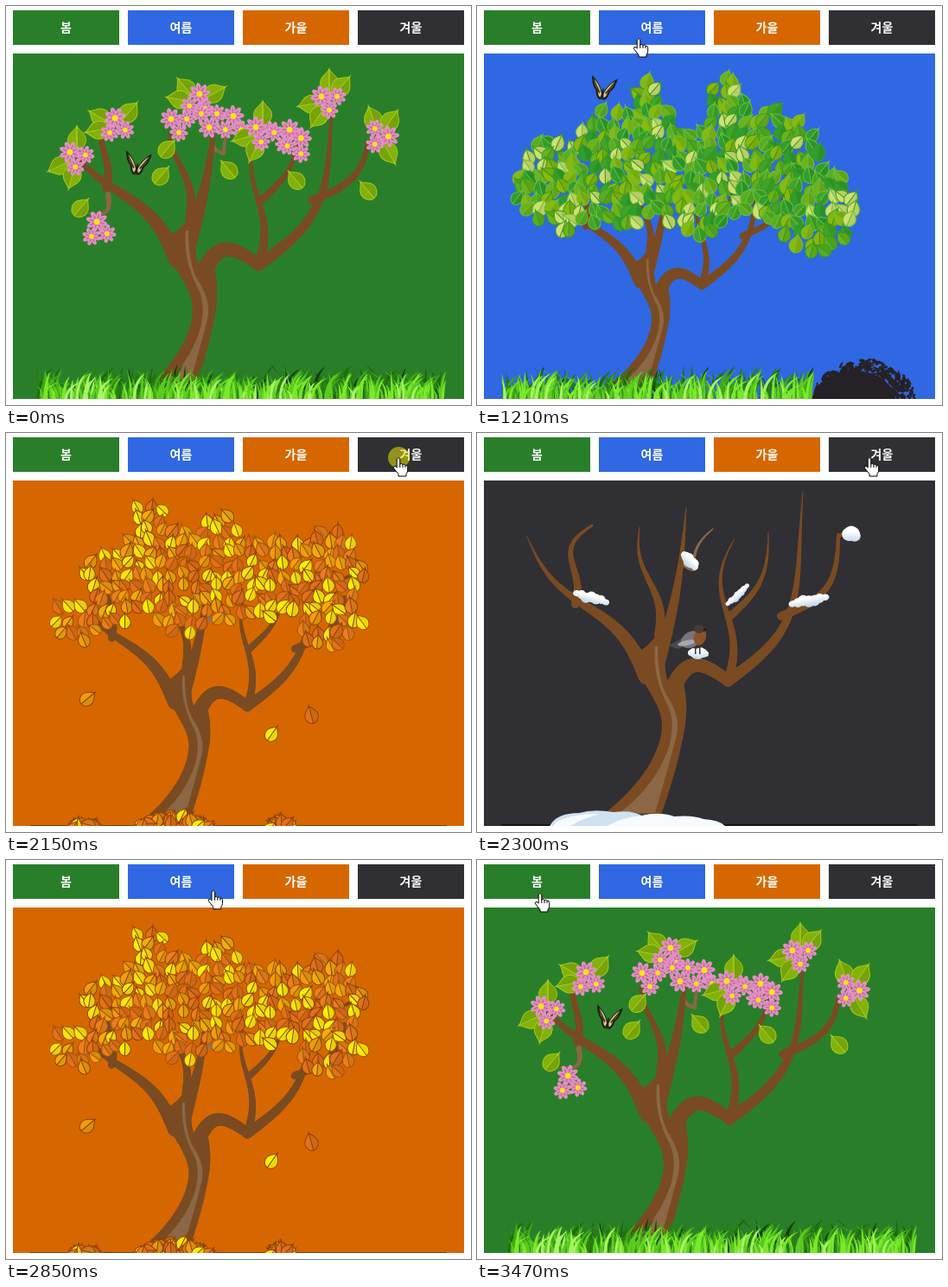
An HTML page with a canvas that plays this animation: 538x462 px, repeating every 3640 ms.

```html
<!DOCTYPE html>
<html lang="ko">
<head>
<meta charset="utf-8">
<title>사계절 나무</title>
<style>
  html, body { margin: 0; width: 100%; height: 100%; overflow: hidden; background: #fff; }
  .tab {
    position: absolute; top: 5px; width: 123px; height: 40px;
    font: 700 14px/38px "Noto Sans CJK KR", "Noto Sans CJK", sans-serif;
    color: #fff; text-align: center;
  }
  canvas { position: absolute; left: 8px; top: 55px; visibility: hidden; }
  #press, #cursor { position: absolute; left: 0; top: 0; visibility: hidden; }
  #press {
    width: 25px; height: 25px; margin: -12.5px; border-radius: 50%;
    background: rgba(230, 230, 10, .55);
  }
  #cursor { overflow: visible; fill: #fff; stroke: #000; stroke-linejoin: round; }
</style>
</head>
<body>
<div id="press"></div>
<svg id="cursor" width="1" height="1">
  <g id="hand">
    <path d="M-1.8 2Q0-.8 1.8 2V8Q4 6.8 5 8.5Q7 7.5 8 9.3Q10.7 8.6 10.7 11.5V15.5Q10.5 18 9 19.5V22H0V19.5Q-3 16-5.6 12.5Q-5.8 9.8-3.2 10.6L-1.8 12.2Z"/>
    <path d="M1.8 8V12M5 8.5V12M8 9.3V12" fill="none"/>
  </g>
  <path id="arrow" d="M0 0V16L4 12.5L6.5 18.5L9 17.4L6.5 11.6H11.5Z"/>
</svg>
<script>
const start = performance.now();
const LOOP = 3640, STEP = 77, FLOOR = 455;
const BARK = '#7a4b22', LIGHT_BARK = '#8c6746';
const seasons = [
  { name: '봄', color: '#297f29', draw: spring },
  { name: '여름', color: '#2f68e2', draw: summer },
  { name: '가을', color: '#d66700', draw: autumn },
  { name: '겨울', color: '#302f34', draw: winter }
];

let c, seed;
const rnd = () => (seed = (seed * 16807) % 2147483647) / 2147483647;
const between = (a, b) => a + (b - a) * rnd();
const pick = list => list[Math.floor(rnd() * list.length)];

function fill(d, color) {
  c.fillStyle = color;
  c.fill(new Path2D(d));
}

function at(x, y, angle, draw) {
  c.save();
  c.translate(x, y);
  c.rotate(angle * Math.PI / 180);
  draw();
  c.restore();
}

function oval(x, y, rx, ry, color, angle = 0) {
  c.fillStyle = color;
  c.beginPath();
  c.ellipse(x, y, rx, ry, angle, 0, 7);
  c.fill();
}

// Tapered line from tip to base, bowed by an arc and an S-shaped sway
function limb([x0, y0], [x1, y1], [w0, w1], arc, sway = 0, color = BARK, from = 0) {
  const dx = x1 - x0, dy = y1 - y0, length = Math.hypot(dx, dy);
  c.strokeStyle = color;
  c.lineCap = 'round';
  const point = t => {
    const k = (arc * Math.sin(Math.PI * t) + sway * Math.sin(2 * Math.PI * t)) / length;
    return [x0 + dx * t + dy * k, y0 + dy * t - dx * k];
  };
  for (let t = from; t < 1; t += .02) {
    c.lineWidth = w0 + (w1 - w0) * t;
    c.beginPath();
    c.moveTo(...point(t));
    c.lineTo(...point(t + .02));
    c.stroke();
  }
}

// The fork of the right-hand limbs lands on (x, y)
function tree(x, y, scale, trim) {
  const grow = (tip, base, width, arc, sway, color) => limb(tip, base, width, arc, sway, color, trim);
  c.save();
  c.translate(x, y);
  c.scale(scale, scale);
  c.translate(-290, -292);
  grow([273, 111], [250, 158], [1.5, 4], -7, 0, LIGHT_BARK);
  limb([250, 158], [236, 142], [4, 4], 4, 0, LIGHT_BARK);
  grow([58, 120], [196, 282], [1, 19], 0, -10);
  grow([133, 107], [114, 198], [3, 10], -14, -7);
  grow([188, 109], [211, 235], [1, 12], 0, -6);
  grow([242, 86], [205, 280], [1, 18], 7);
  grow([298, 122], [291, 286], [1, 11], -7, -9);
  grow([337, 115], [293, 212], [1, 9], 15);
  grow([377, 68], [290, 287], [1, 14], 36, -6);
  grow([418, 118], [352, 212], [4, 10], 24);
  grow([443, 125], [418, 120], [1, 4], -8);
  limb([222, 306], [291, 287], [20, 13], 28);
  fill('M147 441C190 408 214 368 214 338C214 312 190 292 173 248L187 253Q200 246 209 232L219 236Q214 272 223 294L239 290Q246 320 238 354Q230 395 213 442Z', BARK);
  fill('M206 247Q203 280 219 312Q230 330 223 360Q210 405 165 440L206 440Q222 385 231 350Q236 328 219 303Q209 285 209 247Z', LIGHT_BARK);
  c.restore();
}

function leaf(x, y, angle, size, color, edge) {
  at(x, y, angle, () => {
    const h = size / 2, w = size * .43;
    const half = side => `M0 ${-h}C${side * w * .2} ${-h * .6} ${side * w} ${-h * .4} ${side * w * .85} ${h * .35}Q${side * w * .6} ${h} 0 ${h}Z`;
    fill(half(-1), color);
    fill(half(1), color);
    fill(half(1), 'rgba(0, 40, 0, .1)');
    c.strokeStyle = edge;
    c.lineWidth = 1;
    c.stroke(new Path2D(half(-1) + half(1)));
  });
}

// Leaves on a jittered grid wherever one of the oval lobes covers it
function canopy(lobes, step, size, colors, edges) {
  for (let y = 60; y < 300; y += step)
    for (let x = 35; x < 450; x += step) {
      const px = x + between(-4, 4), py = y + between(-4, 4);
      if (lobes.some(([lx, ly, rx, ry]) => Math.hypot((px - lx) / (rx - 6), (py - ly) / (ry - 6)) < 1))
        leaf(px, py, between(-55, 45), size * between(.9, 1.1), pick(colors), pick(edges));
    }
}

function flower(x, y, r) {
  for (let i = 0; i < 8; i++)
    at(x, y, i * 45 + x * 7, () => {
      oval(0, -r * .6, r * .23, r * .42, '#e58fc6');
      oval(0, -r * .42, r * .08, r * .3, '#c96aa6');
    });
  oval(x, y, r * .28, r * .28, '#f8e413');
}

const springLeaf = (x, y, angle, size) => leaf(x, y, angle, size, '#83b20a', '#a9c81f');

// Three blossoms in a triangle, with leaves fanning out behind
function blossom(x, y, turn, ...leafAngles) {
  const polar = (angle, r) => [x + r * Math.sin(angle * Math.PI / 180), y - r * Math.cos(angle * Math.PI / 180)];
  for (const a of leafAngles) springLeaf(...polar(a, 23), a, 28);
  for (let i = 0; i < 3; i++) flower(...polar(turn + 120 * i, 10.5), i ? 10.5 : 12.5);
}

function grass(x0, x1) {
  const tones = ['#123d08', '#1f690d', '#2a7d10', '#3fa817', '#5ccc1e', '#7be82c', '#a8f268'];
  const n = (x1 - x0) * 1.3;
  for (let i = 0; i < n; i++) {
    const k = i / n, x = between(x0 + 3, x1 - 3);
    const h = between(14, 41 - 10 * k);
    const end = Math.max(x0, Math.min(x1, x + between(-20, 20)));
    const tone = Math.floor(k * 5 + between(0, 2));
    fill(`M${x - 1.6} 456Q${x - 1} ${FLOOR - h * .75} ${end} ${FLOOR - h}Q${x + 2} ${FLOOR - h * .6} ${x + 1.6} 456Z`, tones[tone]);
  }
}

function butterfly(x, y) {
  at(x, y, 8, () => {
    for (const side of [-1, 1]) {
      c.save();
      c.scale(side, 1);
      fill('M0 5Q6-8 15-14Q14-3 8 3Q7 11 2 13L0 9Z', '#211d14');
      fill('M1 6Q5-5 12-10Q11-3 6 2Q5 9 2 10Z', '#d6c88c');
      fill('M3 4L12-10L13-9L4 6Z', '#3a3221');
      c.restore();
    }
    oval(0, 6, 1.2, 7, '#211d14');
  });
}

function snow(x, y, w, h, angle) {
  at(x, y, angle, () => {
    const tint = c.createLinearGradient(0, -h / 2, 0, h / 2);
    tint.addColorStop(.3, '#fff');
    tint.addColorStop(1, '#b9d2e6');
    for (let i = 0; i < 7; i++) {
      const u = i / 3 - 1, r = h * (.45 - .2 * u * u);
      oval(u * (w / 2 - h * .25), between(-.1, .1) * h, Math.max(r, w * .1), r, tint);
    }
  });
}

function spring() {
  tree(292, 305, 1, .2);
  limb([97, 240], [118, 218], [2, 6], -12, 0, LIGHT_BARK);
  for (const [x, y] of [[87, 233], [187, 165], [180, 196], [257, 189], [335, 201], [418, 213]])
    springLeaf(x, y, x < 200 ? 40 : -40, 25);
  blossom(82, 176, -50, 0, -115, 195);
  blossom(128, 140, -10, -60, 40, -100);
  blossom(107, 260, -10);
  blossom(222, 112, 10, -40, 60, -80);
  blossom(200, 136, -60);
  blossom(235, 130, 180);
  blossom(263, 138, 0);
  blossom(297, 147, -50, 0, -105, 205);
  blossom(320, 150, 50);
  blossom(336, 162, 30);
  blossom(374, 110, -60, 0, 40, -100, 215);
  blossom(432, 151, 90, -20, 35, 150);
  butterfly(152, 183);
  grass(34, 509);
}

// Dark flecks that thin out toward the rim
function bush() {
  oval(436, 460, 49, 38, '#272227');
  for (let i = 0; i < 380; i++) {
    const a = between(3.1, 6.3), r = between(.5, 1);
    oval(448 + 58 * r * Math.cos(a), 456 + 46 * r * Math.sin(a),
      between(1, 5), between(.6, 2.2), '#272227', a + 1.6 + between(-.7, .7));
  }
}

function summer() {
  tree(260, 327, .76, .2);
  const lobes = [
    [105, 205, 68, 62], [165, 185, 60, 78], [200, 130, 32, 50], [288, 122, 30, 52],
    [255, 200, 65, 70], [345, 185, 62, 72], [392, 235, 54, 56]
  ];
  canopy(lobes, 12.5, 20, ['#2f9e2e', '#3fa52a', '#58ae22', '#6cb21a', '#8ab80c', '#8ab80c', '#cfe070'],
    ['#6cbf3a', '#379a24']);
  butterfly(146, 96);
  grass(28, 390);
  bush();
}

function autumn() {
  const colors = ['#e2701a', '#e2701a', '#ea7f1c', '#f09c0c', '#f3ab08', '#fff000', '#fde60a'];
  const edge = '#8f4208';
  tree(279, 321, .89, .2);
  oval(239, 216, 7, 3, '#7d7770');
  const lobes = [
    [82, 216, 37, 31], [125, 175, 45, 55], [165, 120, 32, 50], [205, 170, 55, 68],
    [252, 155, 45, 70], [300, 168, 55, 56], [370, 162, 50, 58], [373, 215, 45, 42]
  ];
  canopy(lobes, 13, 18.5, colors, [edge, '#a55208']);
  leaf(95, 307, 50, 21, '#f09c0c', edge);
  leaf(308, 348, 35, 20, '#fff000', edge);
  leaf(353, 326, -15, 21, '#e2701a', edge);
  c.fillStyle = '#7d3d02';
  c.fillRect(28, 454, 482, 1);
  const pile = (x, width, rise) => {
    for (let i = 0; i < width * .35; i++) {
      const u = rnd();
      leaf(x + (u - .5) * (width - 18), 458 - rise * Math.sin(u * Math.PI) * between(.4, 1),
        between(-100, 100), 18, pick(colors), edge);
    }
  };
  pile(91, 46, 11);
  pile(195, 106, 17);
  pile(319, 46, 11);
}

function bird() {
  fill('M222 246L240 236L246 246L232 250Z', '#4d4a4d');
  oval(248, 239, 13, 9, '#77757a', -.5);
  oval(243, 243, 11, 3, '#a9a8ad', -.2);
  oval(258, 236, 7, 10, '#8a5428', .3);
  oval(257, 227, 6, 5, '#4a3a34');
  fill('M262 226L267 228L262 230Z', '#222');
  fill('M252 248V256H253.5V248ZM257 248V256H258.5V248Z', '#3c3230');
}

function winter() {
  tree(290, 292, 1, 0);
  snow(132, 191, 42, 14, 14);
  snow(246, 148, 26, 15, 42);
  snow(302, 188, 34, 10, -43);
  snow(384, 194, 46, 15, -12);
  snow(433, 118, 21, 19, 0);
  snow(256, 255, 24, 14, 0);
  bird();
  c.fillStyle = '#17161a';
  c.fillRect(28, 453, 482, 2);
  fill('M84 455Q92 440 118 440Q135 435 158 439Q180 436 192 444L205 455Z', '#cfe2f1');
  fill('M150 455Q172 444 190 443Q212 438 228 444Q250 442 262 447Q280 448 287 455Z', '#f6fbff');
  fill('M92 450Q110 441 142 441Q120 447 108 455H88Z', '#f6fbff');
}

const layers = seasons.map(({ name, color, draw }, i) => {
  const tab = document.createElement('div');
  tab.className = 'tab';
  tab.textContent = name;
  tab.style.cssText = `left:${8 + 133 * i}px;background:${color}`;
  const canvas = document.createElement('canvas');
  canvas.width = 522;
  canvas.height = 400;
  document.body.prepend(tab, canvas);
  c = canvas.getContext('2d');
  c.fillStyle = color;
  c.fillRect(0, 0, 522, 400);
  c.translate(-8, -55);
  seed = 4711 + i;
  draw();
  return canvas;
});

// The pointer travels to a tab, presses on arrival and opens its season on release
const entry = [447, 446];
const moves = [
  { from: 70, to: 590, goal: [40, 24], release: 590 },
  { from: 740, to: 1132, goal: [187, 37], release: 1210 },
  { from: 1370, to: 1680, goal: [326, 20], release: 1750 },
  { from: 1920, to: 2148, goal: [454, 28], release: 2300 },
  { from: 2300, to: 2608, goal: [348, 34], release: 2680 },
  { from: 2680, to: 2910, goal: [214, 35], release: 3080 },
  { from: 3080, to: 3392, goal: [73, 38], release: 3470 }
];
const tabAt = x => Math.floor((x - 8) / 133);

const [press, cursor, hand, arrow] = ['press', 'cursor', 'hand', 'arrow'].map(id => document.getElementById(id));
const show = (el, on) => { el.style.visibility = on ? 'visible' : 'hidden'; };

function position(i, t) {
  const { from, to, goal } = moves[i];
  const origin = i ? moves[i - 1].goal : entry;
  const steps = Math.round((to - from) / STEP);
  const u = Math.min(1, Math.floor((t - from) / (to - from) * steps) / steps);
  const k = 1 - (1 - u) ** 1.5;
  return origin.map((v, axis) => v + (goal[axis] - v) * k);
}

function frame() {
  const t = (performance.now() - start) % LOOP;
  const current = moves.filter(m => t >= m.from).length - 1;
  const opened = moves.filter(m => t >= m.release).pop() || moves[0];
  const entered = current >= 0;
  layers.forEach((el, i) => show(el, i === tabAt(opened.goal[0])));
  show(press, entered && t >= moves[current].to && t < moves[current].release);
  const [x, y] = entered ? position(current, t) : entry;
  const onTab = y >= 5 && y < 45 && (x - 8) % 133 < 123;
  press.style.transform = cursor.style.transform = `translate(${x}px, ${y}px)`;
  show(hand, entered && onTab);
  show(arrow, entered && !onTab);
  requestAnimationFrame(frame);
}
frame();
</script>
</body>
</html>
```
